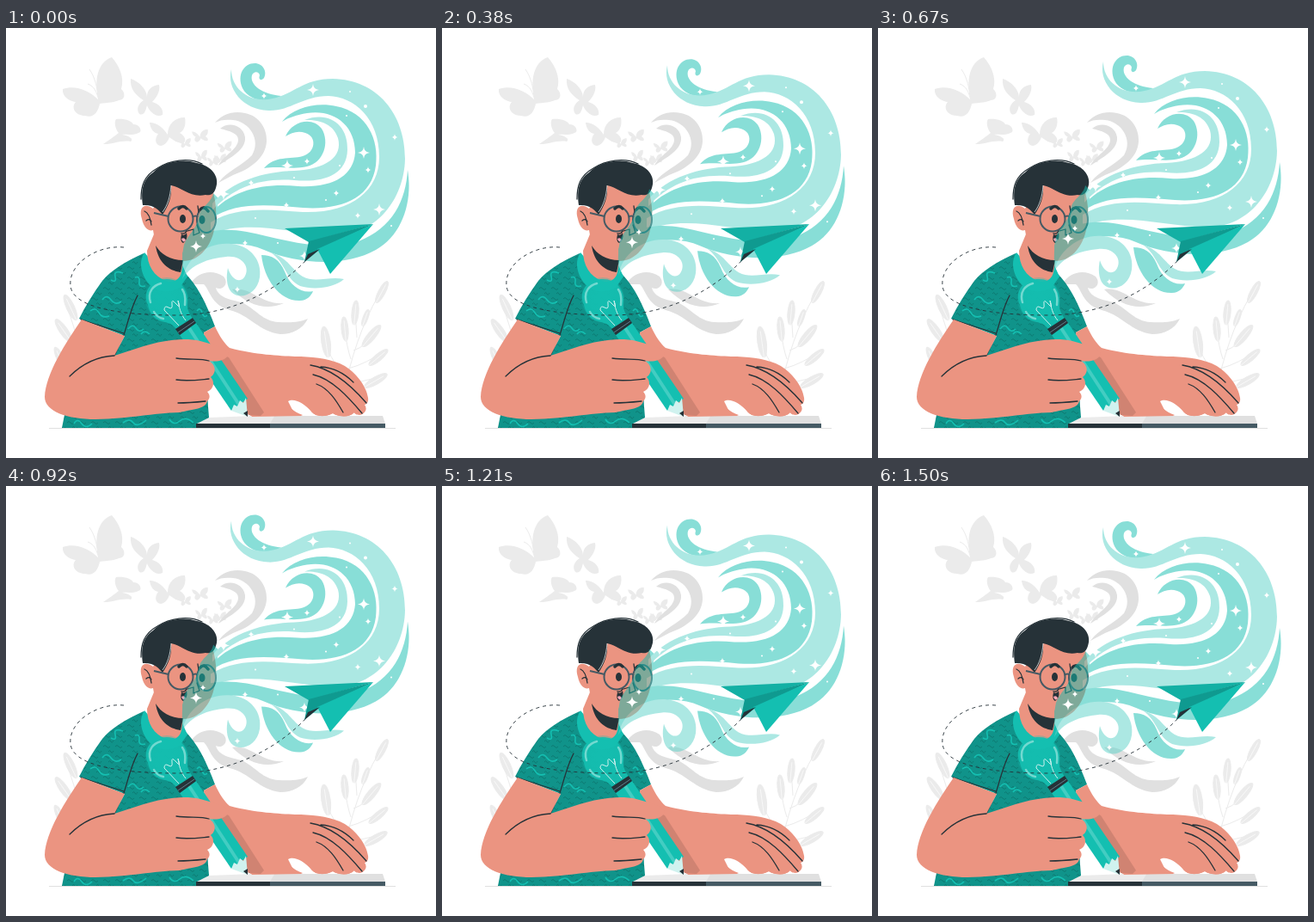
Write an HTML page that moves like this. It is 500 by 500 pixels and loops after 1.54 s.

```html
<!DOCTYPE html>
<html lang="en">
<head>
<meta charset="utf-8">
<title>Imagination</title>
<style>
html, body { margin: 0; height: 100%; overflow: hidden; background: #fff; }
svg { display: block; width: 100vw; height: 100vh; }
.line { fill: none; stroke: #263238; stroke-width: 1.3; stroke-linecap: round; stroke-linejoin: round; }
.skin { fill: #eb9481; }
.dark { fill: #263238; }
.teal { fill: #14bfb1; }
.pale { fill: #5bd3c9; }
</style>
</head>
<body>
<svg viewBox="0 0 500 500">
<defs>
  <path id="butterfly" d="M188 124C180 112 172 110 167 110C168 118 172 122 177 123C172 130 174 136 180 137C186 136 189 130 190 127C194 130 199 134 206 134C210 132 209 126 202 122C206 120 210 114 208 104C196 104 188 112 188 124Z"/>
  <pattern id="weave" width="14" height="12" patternUnits="userSpaceOnUse">
    <rect width="14" height="12" fill="#10938a"/>
    <path d="M1 3q2-3 4 0t4 0M7 9q2-3 3 0t3-1" fill="none" stroke="#0c7a72"/>
  </pattern>
  <radialGradient id="glow">
    <stop offset=".3" stop-color="#14bfb1"/>
    <stop offset="1" stop-color="#14bfb1" stop-opacity=".45"/>
  </radialGradient>
</defs>

<!-- Backdrop -->
<g fill="#ebebeb">
  <path d="M108 84C96 72 80 66 66 71C65 80 74 85 81 86C75 93 81 102 92 102C102 105 107 98 109 88C118 87 128 86 131 84C139 84 139 75 134 71C138 58 132 44 123 34C106 40 102 62 108 84Z"/>
  <path d="M108 84C106 70 104 58 97 48M108 84C105 74 103 68 95 65" fill="none" stroke="#ebebeb"/>
  <path d="M160 84C150 78 144 70 145 59C154 62 163 70 164 80C164 72 169 67 178 66C180 74 174 82 170 86C178 88 184 95 182 101C174 105 166 96 164 90C162 98 160 102 155 100C151 94 154 88 160 84Z"/>
  <path d="M131 122C126 116 126 108 128 106C138 105 146 108 148 112C154 112 158 117 156 121C148 126 139 123 135 124C146 126 148 130 145 132C134 130 122 136 113 135C120 130 126 126 131 122Z"/>
  <use href="#butterfly"/>
  <use href="#butterfly" transform="translate(141 71) scale(.45)"/>
  <use href="#butterfly" transform="translate(146 94) scale(.33)"/>
  <use href="#butterfly" transform="translate(165 98) scale(.33 .42)"/>
  <use href="#butterfly" transform="translate(184 110) scale(.3 .37)"/>
  <use href="#butterfly" transform="translate(187 112) scale(.33)"/>
  <use href="#butterfly" transform="translate(179 90) scale(.4)"/>
</g>
<g fill="#e0e0e0">
  <path d="M243 110C252 100 264 96 278 99C294 102 304 117 303 132C302 151 284 164 264 171L247 180C257 166 275 160 286 148C297 130 283 109 264 107C255 106 249 107 243 110Z"/>
  <path d="M249 117C259 108 276 113 278 127C279 140 266 148 247 160C253 148 270 141 270 130C270 122 260 120 249 117Z"/>
  <path d="M214 298C223 283 240 280 253 289C260 297 252 306 244 302C247 314 262 316 274 319C291 327 298 341 317 342C332 343 342 342 351 338C345 350 333 356 319 356C294 353 284 334 260 328C238 322 237 304 230 298Z"/>
  <path d="M263 304C285 300 296 322 323 320C303 329 282 323 263 304Z"/>
</g>
<g id="leaves" fill="#ebebeb" stroke="#ebebeb"></g>
<path d="M50 465.5H453" stroke="#e0e0e0"/>

<!-- Torso -->
<path d="M160 262C138 272 122 282 112 294C101 309 92 324 85 338L138 358L126 381L70 440L65 465H237L235 440L230 354L243 347C232 318 222 298 207 284L185 292Z" fill="url(#weave)"/>
<path d="M112 316q5-7 10 0t12 2M98 329q6-5 10 2t12 4M122 293q7 4 5-4t9-4M150 290q6-2 5 5t7 5M142 350q5-7 9-1t9 1M222 329q4-5 6 2t6 3M79 460q4-7 9 0t12 0M136 459q8-6 12 0t15-3M190 455q5 8 12 2t16 2M157 356q4-6 10 0" fill="none" stroke="#14bfb1" stroke-width="1.6"/>
<path class="teal" d="M161 261C155 270 156 281 162 292C172 308 188 309 202 302L211 289L205 276L184 288Z"/>
<path class="skin" d="M164 259C164 276 172 289 186 294C194 297 202 293 204 284L207 266L174 235Z"/>
<path class="line" d="M153 311C145 326 142 342 137 357L126 381M87 339L137 355"/>

<!-- Far arm, notebook and pencil -->
<path class="skin" d="M230 354L243 347C248 358 254 367 260 372C290 380 318 381 336 382C355 382 373 384 388 390C404 397 419 415 421 430C422 436 418 438 417 438C423 447 411 452 405 447C398 454 386 452 380 448C370 453 360 452 355 446C346 435 334 430 328 434C327 440 334 446 345 450L318 453H286L232 388Z"/>
<path d="M236 453L313 450L309 460H222Z" fill="#ebebeb"/>
<path d="M313 450L350 451H438L441 460H307Z" fill="#e0e0e0"/>
<path class="skin" d="M286 452L270 430H326L334 446L345 451ZM355 446H417C415 452 405 450 405 447C398 454 386 452 380 448C370 453 360 452 355 446Z"/>
<path d="M221 460H309V465H221Z" class="dark"/>
<path d="M307 460H441V465H307Z" fill="#455a64"/>
<path d="M240 375L259 383L300 447L296 451L282 450Z" fill="#d08372"/>
<path class="line" d="M354 392C378 396 400 414 419 436M357 403C379 408 398 429 414 448M361 414C375 419 384 433 392 447M366 394C382 395 394 402 404 412"/>
<path class="teal" d="M202 357L221 343L281 431L262 445Z"/>
<path d="M213 349L271 438" stroke="#43cdc2" stroke-width="4"/>
<path d="M262 445L265 438L269 440L272 433L276 436L279 430L281 452Z" fill="#d0f2ef"/>
<path d="M276 448L281 445L281 452Z" class="dark"/>

<!-- Near arm -->
<path class="skin" d="M88 339C70 365 46 402 45 429C45 446 72 455 104 455C145 454 170 448 202 447C218 443 232 443 234 434C238 430 237 426 234 423C242 420 243 411 238 406C246 400 243 391 236 387C246 389 258 386 259 378C257 371 240 368 226 364C205 359 180 364 160 370L126 381L138 358Z"/>
<path class="line" d="M74 405C88 391 106 382 126 381M198 384C214 386 227 384 236 387M198 409C212 411 225 409 236 408M200 436C212 436 222 435 232 434"/>

<!-- Bulb -->
<path d="M165 322C158 305 170 292 187 292C204 292 212 306 211 318C210 328 214 333 217 338L198 350C192 342 186 343 178 340C170 336 167 330 165 322Z" fill="#14bfb1" opacity=".9"/>
<circle cx="187" cy="315" r="25" fill="url(#glow)" opacity=".6"/>
<path d="M168 319C164 306 172 299 180 297M205 304C210 311 208 318 208 322M172 330q4 7 11 8" fill="none" stroke="#72d9d0" stroke-width="2.5" stroke-linecap="round"/>
<path d="M201 346L184 328q0-6 5-3t4-4t5 0t2-4M209 340C203 333 201 324 200 317" fill="none" stroke="#d0f2ef"/>
<path d="M197 350L217 337L221 343L202 357Z" class="dark"/>
<path d="M200 354L219 341" stroke="#607d8b"/>

<!-- Head -->
<path class="skin" d="M171 210C160 202 154 210 158 222C160 232 166 237 171 235L174 252C181 263 192 270 206 271C224 271 236 256 241 239C246 222 245 204 240 188L190 180Z"/>
<path class="dark" d="M174 253C180 263 191 270 206 270L203 284C189 282 177 273 174 253Z"/>
<path class="dark" d="M159 206C157 190 158 177 171 168C182 156 205 151 222 157C239 160 249 173 244 186C242 193 238 195 232 194C215 198 204 185 192 183C193 196 189 207 182 217C178 212 172 205 159 206Z"/>
<path class="line" stroke-width=".8" d="M157 199C157 184 160 172 176 163C190 154 212 150 228 158M161 213C166 215 168 222 169 229M163 224q4-3 6 1"/>
<path d="M192 183C191 196 188 206 182 214" fill="none" stroke="#fff" stroke-width=".7"/>
<g fill="none" stroke="#455a64" stroke-width="2">
  <circle cx="203" cy="222" r="14.5"/>
  <ellipse cx="233" cy="223" rx="11" ry="15"/>
  <path d="M172 215L189 219M217 220q3-3 6 0"/>
</g>
<ellipse class="dark" cx="205.500" cy="222" rx="3.500" ry="5"/>
<ellipse class="dark" cx="228" cy="223" rx="3.500" ry="5"/>
<path class="line" stroke-width="1.300" d="M223 207L224 214M222 229L225 238L218 241L218 234L211 236M204 239q4 1 6-3"/>
<path class="line" style="stroke-width:3.500" d="M201 210Q206 205 210 210M226 211Q230 206 235 213"/>
<path d="M204 240Q208 242 210 238Q212 246 206 250Q202 248 204 240Z" fill="#263238"/>
<path d="M204 245q4-2 5 2q-3 4-5-2" fill="#f7a8b8"/>

<!-- Drifting imagination -->
<g id="dream">
  <g opacity=".5">
    <path class="teal" d="M241 192C239 204 226 207 224 220C222 234 211 240 207 252C204 265 205 280 205 292C213 277 224 263 240 254L247 198Z"/>
    <path class="teal" d="M320 79C308 88 283 86 275 70C268 54 277 41 289 41C299 41 304 51 300 58C297 62 293 60 295 55C294 50 288 50 286 55C283 66 298 77 320 79Z"/>
    <path class="pale" d="M262 48C262 72 285 88 310 82C335 77 345 59 380 59C432 60 464 100 464 152C463 200 430 238 390 240C340 243 285 220 238 240V226C270 206 310 212 345 214C400 216 434 190 434 150C434 105 405 80 375 79C345 79 330 97 305 96C275 95 256 70 262 48Z"/>
    <path class="teal" d="M238 216C262 188 300 180 340 184C380 186 404 172 406 145C406 112 380 94 350 99C338 101 329 104 321 109C334 92 362 86 384 91C420 98 434 130 430 160C425 198 390 212 345 209C300 205 265 203 238 222Z"/>
    <path class="pale" d="M240 204C262 178 300 167 335 166C372 164 392 150 386 128C381 112 365 106 347 107C375 96 398 112 397 142C396 172 368 180 335 177C295 174 265 185 240 212Z"/>
    <path class="teal" d="M325 126C333 107 357 103 367 117C377 133 369 157 350 161C334 165 318 160 300 163C313 148 330 153 345 149C360 145 362 126 348 122C339 119 332 122 325 126Z"/>
    <path class="teal" d="M467 165C473 200 462 240 430 258C395 278 340 275 300 258C270 245 235 250 206 280L205 262C215 240 240 230 280 237C320 245 370 262 410 248C450 232 465 200 467 165Z"/>
    <path class="pale" d="M205 292C210 266 236 248 262 251C285 253 298 271 295 290C292 310 272 317 262 307C256 300 256 288 258 279C262 292 271 297 277 290C285 279 275 264 256 266C235 268 215 275 205 292Z"/>
    <path class="teal" d="M297 264C300 292 318 318 342 317C350 317 355 311 357 306C344 309 330 300 324 283C318 269 309 264 297 264Z"/>
    <path class="pale" d="M308 261C328 267 333 282 345 289C360 297 376 288 393 292C382 302 358 305 342 300C324 291 326 274 308 261Z"/>
  </g>
  <g id="sparkles" fill="#fff"></g>
</g>

<path class="line" style="stroke-width:.9;stroke-dasharray:4 4;stroke-linecap:butt" d="M137 255C105 252 72 275 75 300C78 325 130 334 200 334C270 333 320 300 348 271"/>

<!-- Paper plane -->
<path d="M324 233L427 228L352 249Z" fill="#13b0a4"/>
<path d="M352 248L427 228L363 259L347 272Z" fill="#0f9a90"/>
<path d="M427 228L362 257L377 286Z" class="teal"/>
<path d="M347 272L351 263L365 257Z" class="dark"/>
</svg>
<script>
const byId = id => document.getElementById(id);

// x, y, radius of each four-pointed star
const stars = [
  [357, 72, 7], [416, 145, 7], [434, 211, 7], [327, 160, 7], [253, 193, 7], [221, 254, 7], [347, 265, 6],
  [300, 79, 4], [350, 155, 4], [421, 165, 4], [452, 127, 4], [285, 180, 4], [326, 206, 4],
  [278, 250, 4], [384, 192, 4], [269, 304, 4], [229, 242, 4], [409, 218, 4]
];
const dots = [[418, 91], [400, 74], [396, 102], [335, 174], [316, 250], [290, 221], [448, 230], [372, 200], [388, 160]];
byId('sparkles').innerHTML =
  stars.map(([x, y, r]) => `<path transform="translate(${x} ${y}) scale(${r})" d="M0-1Q.08-.08 1 0Q.08.08 0 1Q-.08.08-1 0Q-.08-.08 0-1"/>`).join('') +
  dots.map(([x, y], i) => `<circle cx="${x}" cy="${y}" r="${i ? 1 : 2}"/>`).join('');

// x, y, length, angle of each leaf
const leaves = [
  [437, 307, 14, 28], [406, 331, 14, 5], [394, 350, 14, -5], [372, 365, 18, -8], [418, 337, 10, 20],
  [425, 358, 16, 40], [433, 383, 14, 50], [430, 410, 15, 60], [75, 325, 16, -25], [67, 352, 16, -35], [63, 384, 14, -25]
];
byId('leaves').innerHTML =
  '<path d="M396 410C405 370 420 330 441 298M397 400Q372 390 372 350M401 385Q396 370 394 350M408 360L406 330M404 375Q420 370 430 350M398 396Q420 390 440 375M396 415L438 405M70 320Q78 350 92 380" fill="none"/>' +
  leaves.map(([x, y, l, a]) => `<g transform="translate(${x} ${y}) rotate(${a})"><ellipse rx="${l / 3.5}" ry="${l}"/><path d="M0 ${-l * .7}V${l}" stroke="#fff" stroke-width=".6"/></g>`).join('');

const LOOP = 1540, START = 40, PEAK = 700, END = 1500, LIFT = 9;
const ease = p => (1 - Math.cos(Math.PI * Math.min(1, Math.max(0, p)))) / 2;

function draw(now) {
  const t = now % LOOP;
  const rise = t < PEAK ? ease((t - START) / (PEAK - START)) : ease((END - t) / (END - PEAK));
  byId('dream').setAttribute('transform', `translate(0 ${-LIFT * rise})`);
  requestAnimationFrame(() => draw(performance.now() - begin));
}
const begin = performance.now();
draw(0);
</script>
</body>
</html>
```
